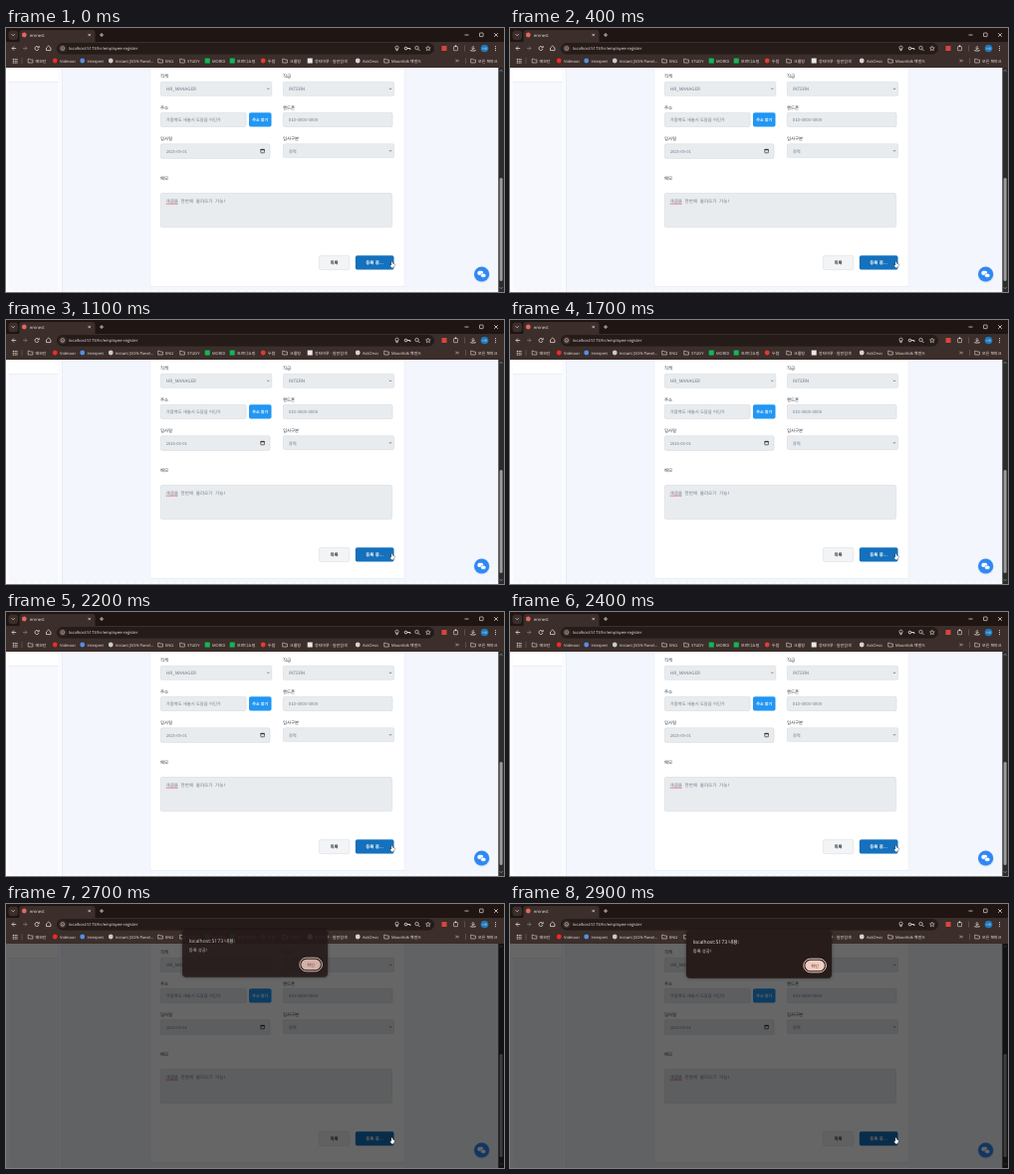
Animation of 500 by 266 pixels, one loop 3 s. Source, as an HTML page with a canvas:

```html
<!DOCTYPE html>
<html lang="ko">
<head>
<meta charset="utf-8">
<title>Employee register</title>
<style>
html, body { margin: 0; width: 100%; height: 100%; overflow: hidden; background: #f5f7fd; }
canvas { display: block; width: 500px; height: 266px; }
</style>
</head>
<body>
<canvas id="stage" width="500" height="266"></canvas>
<script>
const ctx = document.getElementById('stage').getContext('2d');
const LOOP = 3000;
const SANS = '"Open Sans", "Noto Sans CJK KR", "Noto Sans CJK", sans-serif';
const KR = '"Noto Sans CJK KR", "Noto Sans CJK", "Noto Sans", sans-serif';
const MONO = '"Noto Sans Mono", "Noto Sans CJK KR", "Noto Sans CJK", monospace';
const BAR = '#3b2e2b', STRIP = '#1f1614', ICON = '#e3d6d2';

function rect(x, y, w, h, fill) {
  ctx.fillStyle = fill;
  ctx.fillRect(x, y, w, h);
}

function box(x, y, w, h, r, fill, stroke, width = 0.6) {
  ctx.beginPath();
  ctx.roundRect(x, y, w, h, r);
  if (fill) { ctx.fillStyle = fill; ctx.fill(); }
  if (stroke) { ctx.strokeStyle = stroke; ctx.lineWidth = width; ctx.stroke(); }
}

function dot(x, y, r, fill) {
  ctx.beginPath();
  ctx.arc(x, y, r, 0, Math.PI * 2);
  ctx.fillStyle = fill;
  ctx.fill();
}

function ring(x, y, r, color, width = 0.7, from = 0, to = Math.PI * 2) {
  ctx.beginPath();
  ctx.arc(x, y, r, from, to);
  ctx.strokeStyle = color;
  ctx.lineWidth = width;
  ctx.stroke();
}

function line(points, color = ICON, width = 0.8) {
  ctx.beginPath();
  points.forEach(([x, y]) => ctx.lineTo(x, y));
  ctx.strokeStyle = color;
  ctx.lineWidth = width;
  ctx.stroke();
}

function text(str, x, y, size, color, { font = KR, weight = 400, align = 'left' } = {}) {
  ctx.font = `${weight} ${size}px ${font}`;
  ctx.textAlign = align;
  ctx.textBaseline = 'alphabetic';
  ctx.fillStyle = color;
  ctx.fillText(str, x, y);
}

function cross(x, y, r) {
  line([[x - r, y - r], [x + r, y + r]]);
  line([[x - r, y + r], [x + r, y - r]]);
}

function chevron(x, y, r, color, width) {
  line([[x - r, y - r / 2], [x, y + r / 2], [x + r, y - r / 2]], color, width);
}

function folder(x) {
  line([[x - 2.3, 31.2], [x - 0.6, 31.2], [x + 0.1, 32], [x + 2.4, 32],
    [x + 2.4, 35], [x - 2.3, 35], [x - 2.3, 31]], ICON, 0.6);
}

function tabStrip() {
  rect(0, 0, 500, 14, STRIP);
  box(2.5, 2.5, 9.5, 9.5, 3, BAR);
  chevron(7.2, 7, 1.5);
  box(13.5, 2, 76, 14, 3, BAR);
  dot(18.3, 7, 2.4, '#e2675d');
  text('emnest', 24, 8.7, 4.2, '#f3e9e6', { font: SANS });
  cross(83.7, 7, 1.2);
  line([[94, 7], [98, 7]]);
  line([[96, 5], [96, 9]]);
  line([[460.5, 7], [464.5, 7]]);
  box(475.5, 5, 3.6, 3.6, 0.3, null, ICON, 0.7);
  cross(492, 7, 1.8);
}

function toolbar() {
  rect(0, 14, 500, 26, BAR);
  line([[10.2, 20.5], [6, 20.5]]);
  line([[8, 18.5], [6, 20.5], [8, 22.5]]);
  line([[17, 20.5], [21, 20.5]], '#81736f');
  line([[19, 18.5], [21, 20.5], [19, 22.5]], '#81736f');
  ring(31, 20.5, 2, ICON, 0.8, 0.3, 5.5);
  line([[33.2, 18], [33.2, 19.8], [31.4, 19.8]]);
  line([[40.5, 22.6], [40.5, 20], [42.7, 18], [44.9, 20], [44.9, 22.6], [40.5, 22.6]]);

  box(51, 15, 379, 11.5, 5.7, '#251b19');
  dot(56.8, 20.5, 3.8, BAR);
  ring(56.8, 20.5, 1.8, ICON, 0.6);
  line([[56.8, 20.2], [56.8, 21.6]], ICON, 0.6);
  text('localhost:5173/hr/employee-register', 63, 22.2, 4.1, '#f2e8e5', { font: SANS });
  ring(392.5, 19.7, 1.6, ICON);
  line([[391.4, 21], [392.5, 23.1], [393.6, 21]]);
  ring(401.5, 20.5, 1.3, ICON, 1);
  line([[402.8, 20.5], [405.8, 20.5], [405.8, 22]], ICON, 1);
  ring(412.5, 20, 1.7, ICON);
  line([[413.8, 21.3], [415.4, 22.9]], ICON, 0.9);
  line(Array.from({ length: 11 }, (_, i) => {
    const a = i * Math.PI / 5 - Math.PI / 2, r = i % 2 ? 1.1 : 2.5;
    return [423.8 + r * Math.cos(a), 20.7 + r * Math.sin(a)];
  }), ICON, 0.6);

  rect(437.5, 18, 5, 5, '#d9453a');
  box(449.5, 18.7, 4, 4, 0.5, null, ICON);
  dot(451.5, 18.2, 0.9, ICON);
  line([[460.5, 17.5], [460.5, 23.5]], '#77645f', 0.6);
  line([[469, 18], [469, 21.4]]);
  line([[467.4, 20], [469, 21.6], [470.6, 20]]);
  line([[466.8, 22], [466.8, 23], [471.2, 23], [471.2, 22]]);
  dot(480.5, 20.5, 3.8, '#1f78bd');
  text('HR', 480.5, 21.8, 3.4, '#d9ecfa', { font: SANS, align: 'center' });
  for (const y of [18.6, 20.6, 22.6]) dot(491.5, y, 0.6, ICON);
}

function bookmarks() {
  for (let i = 0; i < 9; i++) rect(6.8 + (i % 3) * 1.8, 30.9 + (i / 3 | 0) * 1.8, 1.1, 1.1, ICON);
  line([[16, 30], [16, 36]], '#77645f', 0.6);
  line([[461.5, 30], [461.5, 36]], '#77645f', 0.6);
  for (const x of [451.5, 453.3]) line([[x, 31.7], [x + 1.2, 33], [x, 34.3]], ICON, 0.6);

  const marks = [
    [29.5, '메모단'], [54, 'Vidmoor', '#f02a28'], [81.5, 'Interpret', '#5590e8'],
    [110, 'Instant JSON Panel...', '#c9c9c9'], [160, 'ENG'], [182, 'STUDY'],
    [207, 'MORDI', '#12b855', 1], [232, '모르디쇼핑', '#12b855', 1], [263, '두람', '#e23a32'],
    [285, '크롤링'], [310, '장터마루 · 일반검색', '#e9e9e9', 1], [358, 'AskOrvo', '#d8d2d0'],
    [387, 'Moonfolk 백엔드'], [474, '모든 북마크']
  ];
  for (const [x, label, color, square] of marks) {
    if (!color) folder(x - 5);
    else if (square) rect(x - 7.3, 30.5, 5, 5, color);
    else dot(x - 4.8, 33, 2.4, color);
    text(label, x, 34.5, 4, '#efe4e1', { font: SANS });
  }
}

function field(x, y, w, h, value, { select, font = KR, size = 4.3 } = {}) {
  box(x, y, w, h, 1.5, '#e9ecef', '#d5dae0', 0.6);
  text(value, x + 5.5, y + 9, size, '#6f7b8a', { font });
  if (select) chevron(x + w - 3.5, y + h / 2, 1.2, '#555', 0.7);
}

function button(x, y, w, h, label, fill, color, stroke, size = 4.4) {
  box(x, y, w, h, 1.8, fill, stroke);
  text(label, x + w / 2, y + h / 2 + 1.7, size, color, { weight: 700, align: 'center' });
}

function page() {
  rect(0, 40, 500, 226, '#f6f8fd');
  rect(0, 40, 3, 226, '#fdfdff');
  rect(3, 40, 49, 14, '#ffffff');
  rect(3, 54, 49, 0.6, '#e4e8f0');
  rect(52, 40, 5, 226, '#fafbff');
  rect(56, 40, 1, 226, '#e9edf5');
  rect(57, 40, 437, 226, '#f3f6fc');
  rect(144.5, 40, 256, 221, '#eceff5');
  rect(145.3, 40, 254.4, 220, '#ffffff');
  for (let x = 3; x < 494; x += 8) rect(x, 264.3, 5, 1, '#ffffff');

  const labels = [[155, 50.3, '직책'], [278, 50.3, '직급'], [155, 81.5, '주소'], [278, 81.5, '핸드폰'],
    [155, 113, '입사일'], [278, 113, '입사구분'], [155, 153, '메모']];
  for (const [x, y, label] of labels) text(label, x, y, 4.4, '#2d333b', { weight: 500 });

  field(155.3, 54.3, 111.5, 14, 'HR_MANAGER', { select: true, size: 4.6 });
  field(278.3, 54.3, 111.2, 14, 'INTERN', { select: true, size: 4.6 });
  field(155.3, 85.3, 85.7, 14.2, '가람북도 새솔시 도담읍 어딘가');
  button(244, 85.3, 22.5, 14.2, '주소 찾기', '#2196f3', '#ffffff', null, 4);
  field(278.3, 85.3, 109.7, 14.2, '010-0000-0000', { size: 4.3 });
  field(155.3, 116.8, 109.7, 14.6, '2025-05-01', { size: 4.1 });
  box(255.8, 122.3, 3.6, 3.5, 0.3, null, '#333', 0.7);
  rect(255.6, 122, 4, 1.2, '#333');
  field(278.3, 116.8, 111.2, 13.8, '경력', { select: true });

  field(155.3, 166.5, 232.2, 34.2, '');
  text('개글을 한번에 올라오기 가능!', 160.5, 175.6, 4.5, '#6f7b8a', { font: MONO });
  line(Array.from({ length: 13 }, (_, i) => [160.5 + i, 176.9 + (i % 2) * 0.7]), '#e04848', 0.7);

  button(314.3, 229.3, 30.5, 14.2, '목록', '#f3f4f6', '#30363d', '#d9dde2');
  button(350.8, 229.3, 38.7, 14.2, '등록 중...', '#1571bd', '#ffffff');

  dot(477.8, 248.6, 8.2, '#d7e3f6');
  dot(477.6, 248, 7.6, '#2f88f3');
  box(473.4, 244.8, 5.8, 4.2, 1.8, '#ffffff');
  box(476.6, 247.4, 5.2, 3.8, 1.6, '#ffffff', '#2f88f3', 0.5);
}

function scrollbar() {
  rect(494.3, 40, 5.7, 226, '#2c2c2c');
  box(495.6, 151, 3, 104, 1.5, '#9c9c9c');
  chevron(497.2, 43, -1.2, '#a0a0a0', 0.9);
  chevron(497.2, 262, 1.2, '#a0a0a0', 0.9);
}

function dialog(alpha, dy) {
  ctx.save();
  ctx.globalAlpha = alpha;
  ctx.transform(1, 0, 0, 1, 0, dy);
  ctx.shadowColor = 'rgba(0,0,0,.5)';
  ctx.shadowBlur = 3;
  box(177, 27, 146, 47.7, 4, '#271c1a');
  ctx.shadowBlur = 0;
  text('localhost:5173 내용:', 183.7, 40, 5.1, '#f4e9e6', { font: SANS, weight: 500 });
  text('등록 성공!', 183.7, 49.2, 4.3, '#e6dad6');
  box(294.8, 55.2, 22.6, 13.6, 6.8, null, '#f0cdc3', 1);
  box(296.4, 56.8, 19.4, 10.4, 5.2, '#f0cdc3');
  text('확인', 306.1, 63.6, 4.2, '#6a2f22', { align: 'center' });
  ctx.restore();
}

function cursor() {
  ctx.beginPath();
  ctx.moveTo(387.2, 235.4);
  for (const [x, y] of [[388, 235.4], [388.3, 237.4], [390, 238], [389.8, 240],
    [389, 241.4], [387, 241.4], [385.7, 239], [386.9, 239]]) ctx.lineTo(x, y);
  ctx.closePath();
  ctx.fillStyle = '#fff';
  ctx.strokeStyle = '#222';
  ctx.lineWidth = 0.7;
  ctx.stroke();
  ctx.fill();
}

function draw(t) {
  ctx.textRendering = 'geometricPrecision';
  page();
  scrollbar();
  const step = Math.floor((t - 2600) / 100);
  if (step >= 0) rect(0, 40, 500, 226, `rgba(0,0,0,${step ? 0.6 : 0.55})`);
  tabStrip();
  toolbar();
  bookmarks();
  if (step >= 0) dialog([0.35, 0.85, 1, 1][step], [-4, -1, 0, 0][step]);
  cursor();
}

const start = performance.now();
function tick() {
  draw((performance.now() - start) % LOOP);
  requestAnimationFrame(tick);
}
tick();
</script>
</body>
</html>
```
